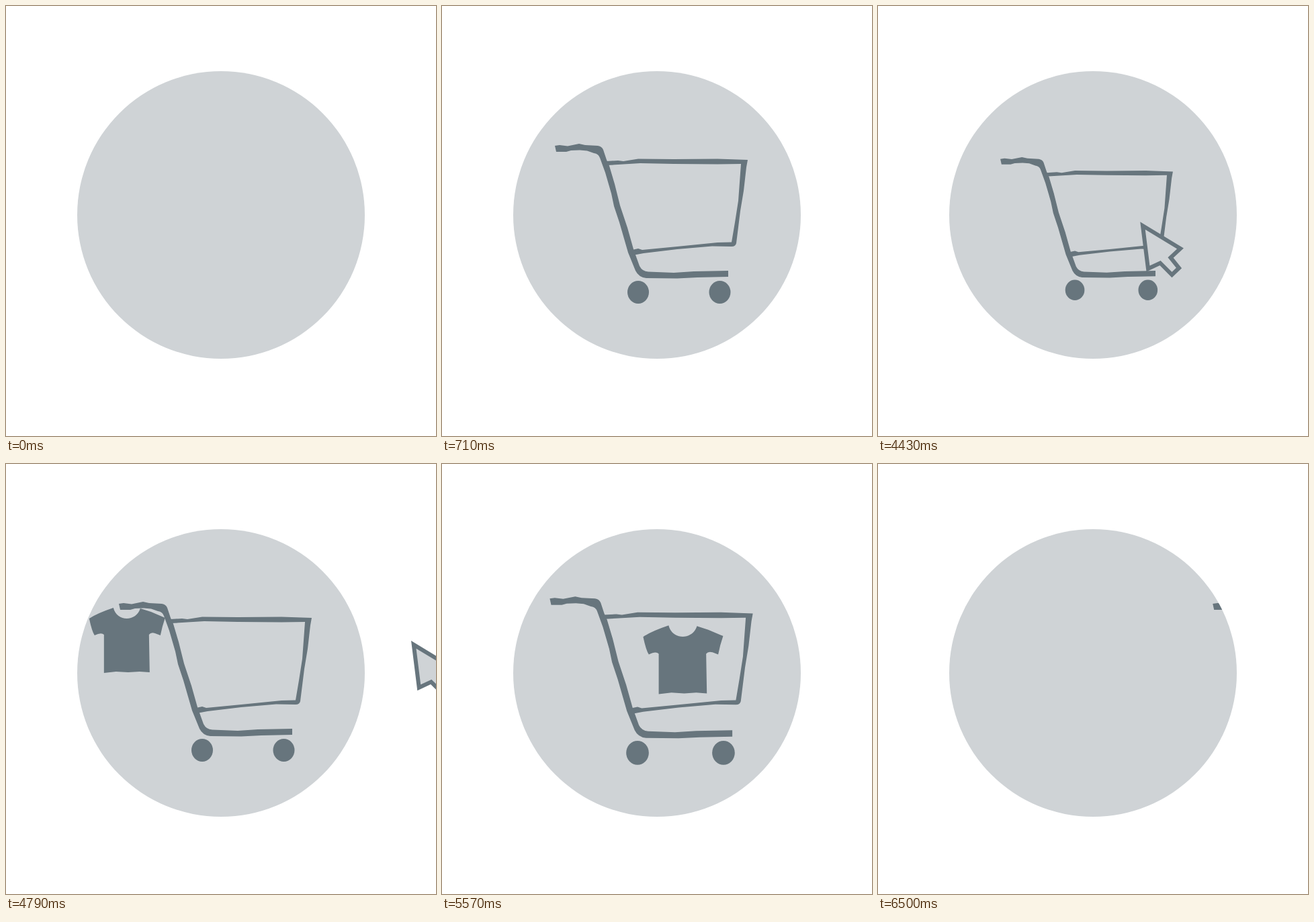
An HTML page that plays this animation: 640x640 px, repeating every 6.57 s.

```html
<!DOCTYPE html>
<html lang="en">
<head>
<meta charset="utf-8">
<title>Add to cart</title>
<style>
  html, body { margin: 0; width: 100%; height: 100%; overflow: hidden; background: #fff; }
  svg { display: block; width: 100%; height: 100%; }
</style>
</head>
<body>
<svg viewBox="0 0 640 640" fill="#67757d">
  <defs><clipPath id="disc"><circle cx="320" cy="311" r="214"/></clipPath></defs>
  <circle cx="320" cy="311" r="214" fill="#cfd3d6"/>
  <g clip-path="url(#disc)">
    <g id="cart">
      <path d="M168 208L175 207L187 208.500L204 205L213 207L232 208Q238 209 240 214L245 229L249 238L257 265L265 297L276 330L285 362L294 387Q298 395 307 395.500L345 397L375 395L426 394V403L380 404L350 405.500L304 405Q293 404 288 394L277 367L264 322L256 298L252 279L243 248L235 226Q233 220 226 219L216 215.500L205 214.500L192 215L185 217L170 217Z"/>
      <path fill-rule="evenodd" d="M244 231L262 230L270 231L292 227.500L345 228L410 227.500L455 229L453 240L449 275L444 305L438 353Q437 358 431 358L402 357.500L350 362L300 368L284 371L283 363L292 361L298 363L350 358L410 352L431 351.500L436 322L441 290L445 235L410 235.500L345 235L295 234L262 236L246 237Z"/>
      <ellipse cx="292" cy="426" rx="16" ry="17"/>
      <ellipse cx="413.500" cy="426" rx="16" ry="17"/>
    </g>
  </g>
  <g id="shirtClip">
    <path id="shirt" d="M336 246C341 267 370 267 376 247L392 252L413 261L409 274L406 287L398 284Q392 282 389 286L390 342L375 341L358 342L340 341L322 343V286Q318 282 308 287Q304 281 300 262Q312 254 336 246Z"/>
  </g>
  <path id="cursor" d="M394 327L450 361L435.500 374.500L448 390L437.500 400L420 382.500L402 391Z" fill="#cfd3d6" stroke="#67757d" stroke-width="6"/>
</svg>
<script>
  const LOOP = 6570, STEP = LOOP / 92;
  const [cart, shirt, shirtClip, cursor] =
    ["cart", "shirt", "shirtClip", "cursor"].map(id => document.getElementById(id));

  const progress = (t, from, to) => Math.min(1, Math.max(0, (t - from) / (to - from)));
  const easeIn = u => u * u;
  const easeOut = u => 1 - (1 - u) ** 2;
  const easeInOut = u => u < 0.5 ? 2 * u * u : 1 - 2 * (1 - u) ** 2;
  const smooth = u => u * u * (3 - 2 * u);
  const bump = (t, from, to) => Math.sin(Math.PI * progress(t, from, to)) ** 2;

  const move = (x, y) => `translate(${x} ${y})`;
  const scaleAt = (s, x, y) => `${move(x, y)} scale(${s}) ${move(-x, -y)}`;

  function draw(t) {
    const slide = -514 * (1 - easeOut(progress(t, 0, 350)))
      + 503 * easeIn(progress(t, 6215, 6565));
    const press = bump(t, 4285, 4569);
    const pop = 1 + 0.088 * (bump(t, 290, 710) + bump(t, 5430, 5925));
    const popped = scaleAt(pop, 311, 353);
    cart.setAttribute("transform",
      `${move(slide, 0)} ${popped} ${scaleAt(1 - 0.105 * press, 302, 395)}`);

    // The shirt flies in from the left, hops up and drops into the basket.
    const landed = t > 5372;
    const shirtX = -415 * (1 - easeOut(progress(t, 4600, 5130)));
    const hop = -32 - 132 * smooth(progress(t, 4940, 5200));
    const shirtY = hop * (1 - easeIn(progress(t, 5200, 5372)));
    shirt.setAttribute("transform", landed
      ? `${move(slide, 0)} ${popped}` : move(shirtX, shirtY));
    shirtClip.setAttribute("clip-path", landed ? "url(#disc)" : "none");
    shirt.style.display = t > 4600 ? "" : "none";

    // The pointer arrives from the lower right, clicks and leaves to the right.
    const away = 1 - easeInOut(progress(t, 3860, 4420));
    const leave = easeInOut(progress(t, 4430, 4930));
    cursor.setAttribute("transform", move(252 * away + 256 * leave, 136.5 * away - 70 * leave));
    cursor.style.display = t > 3860 && t < 4930 ? "" : "none";
  }

  const start = performance.now();
  function tick() {
    const t = Math.max(0, performance.now() - start) % LOOP;
    draw(Math.floor((t + 5) / STEP) % 92 * STEP);
    requestAnimationFrame(tick);
  }
  tick();
</script>
</body>
</html>
```
